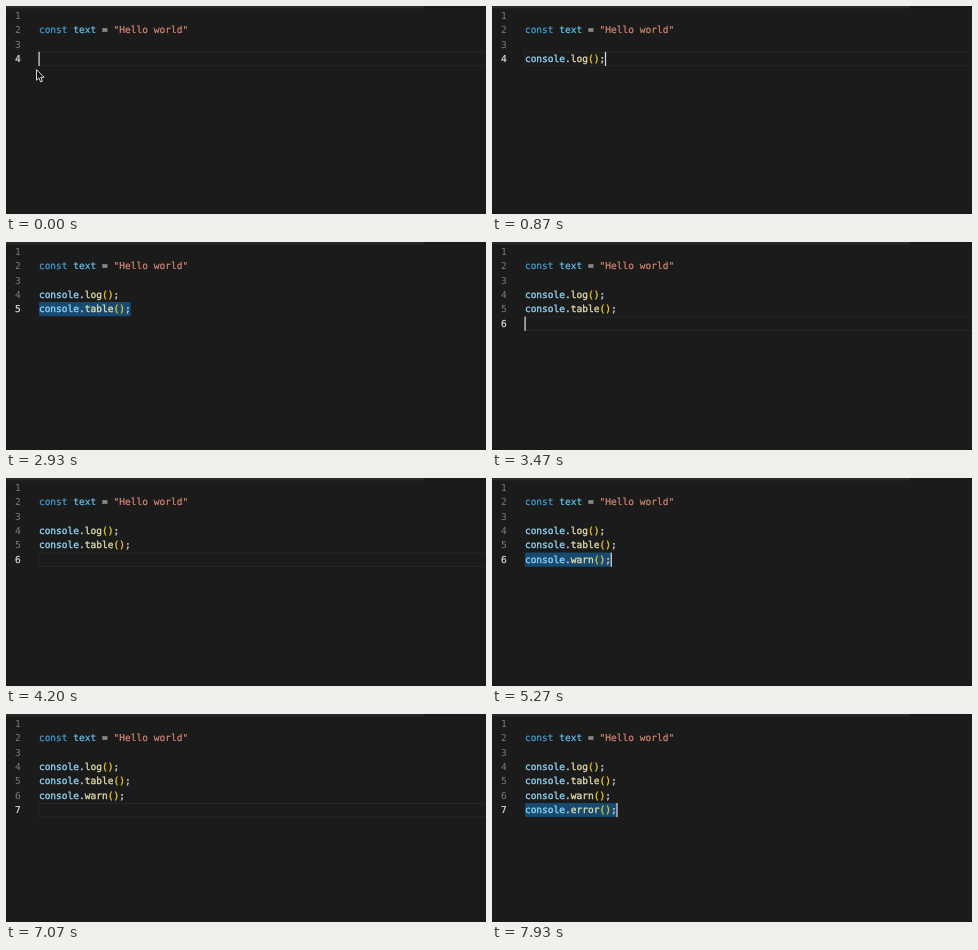
Write an HTML page that moves like this. It is 480 px wide and 208 px high and loops after 8 s.

```html
<!DOCTYPE html>
<html lang="en">
<head>
<meta charset="utf-8">
<title>Console methods</title>
<style>
  html, body { margin: 0; width: 100%; height: 100%; overflow: hidden; background: #1b1b1b; }
  svg { display: block; width: 480px; height: 208px; }
  text {
    font: 9.54px "DejaVu Sans Mono", "Liberation Mono", monospace;
    text-rendering: geometricPrecision;
    white-space: pre;
    stroke-width: .2px;
  }
  .call { stroke-width: .34px; }
  .num { fill: #7c7c7c; }
  .num.on { fill: #dedede; stroke: #dedede; }
  .key { fill: #429fce; stroke: #429fce; }
  .const { fill: #62c3f0; stroke: #62c3f0; }
  .str { fill: #d38673; stroke: #d38673; }
  .obj { fill: #90d4f4; stroke: #90d4f4; }
  .fn { fill: #dedcab; stroke: #dedcab; }
  .par { fill: #e8c72c; stroke: #e8c72c; }
  .op { fill: #d2d2d2; stroke: #d2d2d2; }
</style>
</head>
<body>
<svg viewBox="0 0 480 208">
  <rect width="480" height="208" fill="#1b1b1b"/>
  <rect width="418" height="2.4" fill="#292929"/>
  <rect id="current" x="32.5" width="460" height="13.4" fill="none" stroke="#262626"/>
  <rect id="selection" x="32.9" height="14.2" rx="1.5" fill="#174a71"/>
  <g id="code"></g>
  <rect id="caret" width="1.2" height="14.2" fill="#dcdcdc"/>
  <path id="pointer" d="M30.5 63.6v10.6l2.4-2.2 1.7 3.9 1.9-.8-1.7-3.8h3.2z"
        fill="#111" stroke="#eee" stroke-width=".9" stroke-linejoin="round"/>
</svg>
<script>
const LOOP = 8000, BLINK = 1000, BLINK_ON = 460;
const LEFT = 32.9, CHAR = 5.743, ROW = 14.4, FIRST = 2.2;
const CALL_LINE = 4;

// Each call is pasted as a selection, released, then followed by a new line.
const CALLS = [
  { name: "log", paste: 270, release: 870, enter: 1270 },
  { name: "table", paste: 2200, release: 3130, enter: 3470 },
  { name: "warn", paste: 5270, release: 6200, enter: 6470 },
  { name: "error", paste: 7800, release: LOOP, enter: LOOP }
];
const EVENTS = [0, ...CALLS.flatMap(c => [c.paste, c.release, c.enter])];

const $ = id => document.getElementById(id);
const rowTop = line => FIRST + (line - 1) * ROW;
const show = (el, on) => el.setAttribute("visibility", on ? "visible" : "hidden");

function set(el, attrs) {
  for (const name in attrs) el.setAttribute(name, attrs[name]);
  return el;
}

function add(tag, attrs, parent) {
  const el = document.createElementNS("http://www.w3.org/2000/svg", tag);
  return parent.appendChild(set(el, attrs));
}

function addText(line, x, parts, cls = "") {
  const el = add("text", { x, y: rowTop(line) + 10.5, class: cls }, $("code"));
  for (const [type, str] of parts) add("tspan", { class: type }, el).textContent = str;
  return el;
}

const lineCount = CALL_LINE + CALLS.length - 1;
const numbers = Array.from({ length: lineCount }, (_, i) => addText(i + 1, 9.1, [["num", i + 1]]));

addText(2, LEFT, [["key", "const "], ["const", "text"], ["op", " = "], ["str", '"Hello world"']]);

const rows = CALLS.map((call, i) => addText(CALL_LINE + i, LEFT,
  [["obj", "console"], ["op", "."], ["fn", call.name], ["par", "()"], ["op", ";"]], "call"));

function draw(t) {
  const index = CALLS.filter(c => c.enter <= t).length;
  const call = CALLS[index];
  const pasted = call.paste <= t;
  const selected = pasted && t < call.release;
  const line = CALL_LINE + index;
  const top = rowTop(line);
  const width = pasted ? rows[index].textContent.length * CHAR : 0;
  const idle = t - Math.max(...EVENTS.filter(e => e <= t));

  rows.forEach((el, i) => show(el, CALLS[i].paste <= t));
  numbers.forEach((el, i) => {
    show(el, i < line);
    set(el.firstChild, { class: i + 1 === line ? "num on" : "num" });
  });

  set($("current"), { y: top + .9 });
  show($("current"), !selected);
  set($("selection"), { y: top + .3, width });
  show($("selection"), selected);
  set($("caret"), { x: LEFT + width - .4, y: top + .4 });
  show($("caret"), idle % BLINK < BLINK_ON);
  show($("pointer"), t < CALLS[0].release);
}

const start = performance.now();
function tick() {
  draw((performance.now() - start) % LOOP);
  requestAnimationFrame(tick);
}
draw(0);
requestAnimationFrame(tick);
</script>
</body>
</html>
```
